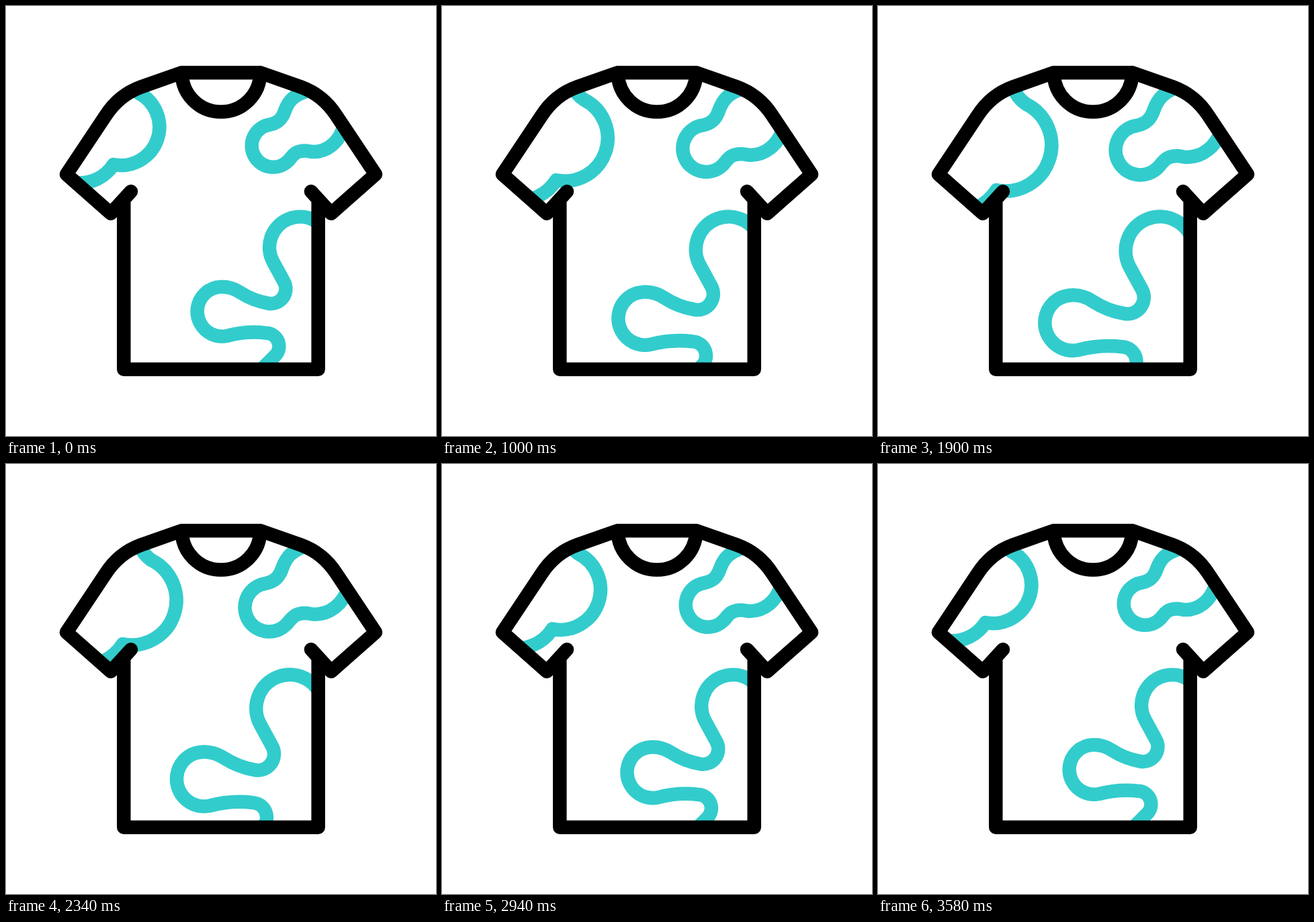
An HTML page that plays this animation: 640 by 640 pixels, repeating every 3600 ms.

```html
<!DOCTYPE html>
<html lang="en">
<head>
<meta charset="utf-8">
<title>T-shirt</title>
<style>
  html, body { margin: 0; width: 100%; height: 100%; overflow: hidden; background: #fff; }
  svg { display: block; width: 100vw; height: 100vh; }
  path { fill: none; stroke-linejoin: round; stroke-width: 20.5px; }
  .outline { stroke: #000; }
  .blob { stroke: #3cc; }
</style>
</head>
<body>
<svg viewBox="0 0 640 640">
  <defs>
    <path id="shirt" d="M186 276 L156 308.7 L90 250.5 L148.5 162.8 C161 143.5 179 128.5 201 120.5
      L261 99.3 H379 L439 120.5 C461 128.5 479 143.5 491.5 162.8 L550 250.5 L484 308.7 L454 276
      L464.7 287.7 V540.7 H175.3 V287.7 Z"/>
    <clipPath id="inside"><use href="#shirt"/></clipPath>
  </defs>
  <g clip-path="url(#inside)">
    <path class="blob" d="M94 261 L105 263 A59 59 0 0 0 160 236 A57 57 0 0 0 196.5 129 Q186 122 180 108"/>
    <path class="blob" d="M450 126 C428 132 420 142 415 156 C411 168 405 174 393 176.5
      A31.8 31.8 0 1 0 420 230.5 C427 223 430 215 446 215.5 C452 216 453 217 458 217
      C478 217 494 203 501 184"/>
    <path class="blob" d="M482 349 A45.5 45.5 0 1 0 398 381.5 L413.5 410 A22 22 0 0 1 390.5 442.6
      C375 440 362 435 348 426 C331 415 309 415 295.5 428.6 A37 37 0 0 0 329 491
      C348 486 366 484 388 486.8 A19.7 19.7 0 0 1 400.5 520.5 L376 545"/>
  </g>
  <use href="#shirt" class="outline"/>
  <path class="outline" d="M261.7 99.3 A58.3 58.3 0 0 0 378.3 99.3"/>
</svg>
<script>
  const LOOP = 3600, STROKE = 20.5;
  // Each blob grows about its own fixed point while its line weight stays constant.
  const growth = [
    { x: 78, y: 45, amount: 0.2 },
    { x: 442, y: 167, amount: 0.16 },
    { x: 589, y: 315, amount: 0.12 },
  ];
  const blobs = document.querySelectorAll('.blob');

  // cubic-bezier(.5, 0, .5, 1)
  function ease(x) {
    let s = x;
    for (let i = 0; i < 6; i++) {
      s -= (1.5 * s - 1.5 * s * s + s ** 3 - x) / (1.5 - 3 * s + 3 * s * s);
    }
    return s * s * (3 - 2 * s);
  }

  function draw() {
    const phase = performance.now() % LOOP / LOOP * 2;
    const progress = ease(phase < 1 ? phase : 2 - phase);
    growth.forEach(({ x, y, amount }, i) => {
      const k = 1 + amount * progress;
      blobs[i].setAttribute('transform', `matrix(${k} 0 0 ${k} ${x * (1 - k)} ${y * (1 - k)})`);
      blobs[i].style.strokeWidth = STROKE / k + 'px';
    });
    requestAnimationFrame(draw);
  }
  draw();
</script>
</body>
</html>
```
